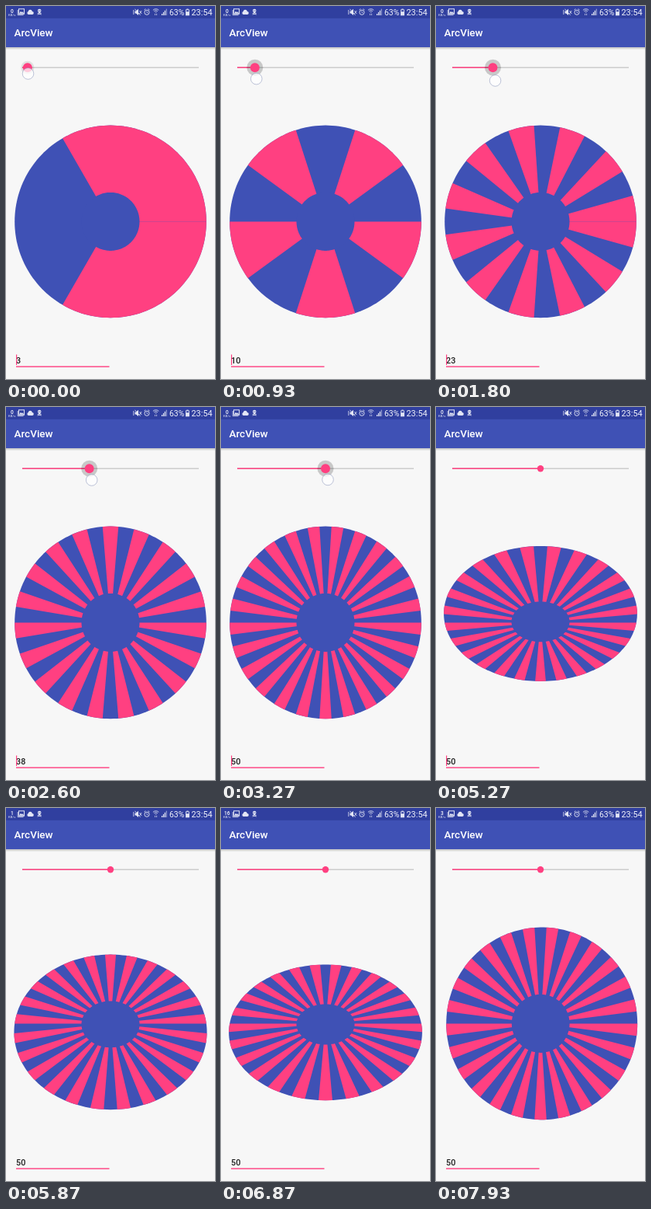
These frames come from a looping animation (270x480 px, 8 s). An HTML page with a canvas:

```html
<!DOCTYPE html>
<html lang="en">
<head>
<meta charset="utf-8">
<title>ArcView</title>
<style>
html, body { margin: 0; width: 100%; height: 100%; overflow: hidden; background: #f7f7f7; }
canvas { display: block; width: 100vw; height: 100vh; }
</style>
</head>
<body>
<canvas id="stage"></canvas>
<script>
const W = 270, H = 480, LOOP = 8000;
const PINK = '#ff4081', BLUE = '#3f51b5', DARK = '#303f9f', PAPER = '#f7f7f7';
const RAD = Math.PI / 180;
const WHEEL = { x: 135, y: 277.4, r: 123.8, hole: 37.5, camera: 680 };
const SPIN = 3000, SPIN_X = 4570, SPIN_Y = 7720;
const RELEASE = 3800;

const canvas = document.getElementById('stage');
const ctx = canvas.getContext('2d');

function resize() {
  const dpr = window.devicePixelRatio || 1;
  canvas.width = Math.round(innerWidth * dpr);
  canvas.height = Math.round(innerHeight * dpr);
}
addEventListener('resize', resize);
resize();

const clamp = v => Math.max(0, Math.min(1, v));
const easeInOut = v => (1 - Math.cos(Math.PI * clamp(v))) / 2;

// Piecewise linear value through [time, value] points
function track(points, t) {
  for (let i = 1; i < points.length; i++) {
    const [t0, v0] = points[i - 1], [t1, v1] = points[i];
    if (t < t1) return v0 + (v1 - v0) * clamp((t - t0) / (t1 - t0));
  }
  return points[points.length - 1][1];
}

const COUNT = [[0, 3], [900, 10.5], [1800, 23.2], [2600, 38.2], [3270, 50]];
const FINGER_DX = [[0, 0.7], [1800, 3.1], [3800, 3]];
const FINGER_Y = [[0, 87], [700, 93], [1800, 96], [2600, 94], [3800, 93]];

function text(str, x, y, size, color, weight = 400, align = 'left') {
  ctx.font = `${weight} ${size}px Roboto, sans-serif`;
  ctx.textAlign = align;
  ctx.fillStyle = color;
  ctx.fillText(str, x, y);
}

function disc(x, y, r, fill, stroke, width = 1) {
  ctx.beginPath();
  ctx.arc(x, y, r, 0, 2 * Math.PI);
  if (fill) { ctx.fillStyle = fill; ctx.fill(); }
  if (stroke) { ctx.strokeStyle = stroke; ctx.lineWidth = width; ctx.stroke(); }
}

function rect(x, y, w, h, color) {
  ctx.fillStyle = color;
  ctx.fillRect(x, y, w, h);
}

function line(points, color, width) {
  ctx.beginPath();
  points.forEach(([x, y]) => ctx.lineTo(x, y));
  ctx.strokeStyle = color;
  ctx.lineWidth = width;
  ctx.stroke();
}

function fillPath(points, color) {
  ctx.beginPath();
  points.forEach(([x, y]) => ctx.lineTo(x, y));
  ctx.closePath();
  ctx.fillStyle = color;
  ctx.fill();
}

function drawWheel(count, ax, ay) {
  const { x: cx, y: cy, camera } = WHEEL;
  const project = (r, deg) => {
    const x = r * Math.cos(deg * RAD), y = r * Math.sin(deg * RAD);
    const y2 = y * Math.cos(ax), z1 = y * Math.sin(ax);
    const x2 = x * Math.cos(ay) + z1 * Math.sin(ay);
    const z2 = z1 * Math.cos(ay) - x * Math.sin(ay);
    const k = camera / (camera - z2);
    return [cx + x2 * k, cy + y2 * k];
  };
  const arc = (r, from, to) => {
    const steps = Math.max(2, Math.ceil((to - from) / 2));
    return Array.from({ length: steps + 1 }, (_, i) => project(r, from + (to - from) * i / steps));
  };
  const sweep = 360 / count;
  fillPath(arc(WHEEL.r, 0, 360), BLUE);
  for (let i = 0; i < count; i += 2) {
    fillPath([[cx, cy], ...arc(WHEEL.r, i * sweep, (i + 1) * sweep)], PINK);
  }
  fillPath(arc(WHEEL.hole, 0, 360), BLUE);
}

function drawSlider(t, count) {
  const x = 21 + count * 2.28, y = 79.2;
  rect(21, y - 0.65, 228, 1.3, '#c6c6c6');
  rect(21, y - 0.75, x - 21, 1.5, PINK);
  if (t < RELEASE) {
    const grow = clamp(t / 150);
    disc(x, y, 8.5 + 2 * grow, `rgba(0,0,0,${0.09 + 0.1 * grow})`);
    disc(x, y, 6, PINK);
  } else {
    disc(x, y, 6 - 1.8 * clamp((t - RELEASE) / 70), PINK);
  }
}

function drawTouch(t, count) {
  if (t < RELEASE) {
    const x = 21 + count * 2.28 + track(FINGER_DX, t);
    disc(x, track(FINGER_Y, t), 7.3, 'rgba(255,255,255,.72)', 'rgba(135,145,185,.6)', 0.9);
  } else if (t >= 4530 && t < 4660) {
    disc(192.3, 316.8, 6.8, 'rgba(175,175,215,.5)', 'rgba(150,150,195,.65)', 0.9);
  }
}

function drawField(t, count) {
  text(String(count), 13, 459.6, 10.8, '#1e1e1e', 500);
  rect(13, 463.4, 120.5, 1.4, PINK);
  const cursorOn = t < 3270 || (t - 3270) % 1000 < 500;
  if (cursorOn) rect(13, 448.5, 1.2, 13.5, PINK);
}

function netSpeed(t) {
  if (t < 5500) return '0';
  if (t < 6500) return '1';
  return t < 7500 ? '16' : '3';
}

function drawStatusIcons() {
  const ink = '#e3e6f5';
  // picture
  ctx.strokeStyle = ink;
  ctx.lineWidth = 1;
  ctx.strokeRect(16.5, 3.8, 7, 6.4);
  line([[15.2, 5], [15.2, 11.6], [22.5, 11.6]], ink, 0.8);
  fillPath([[17, 9.8], [19, 6.8], [20.4, 8.3], [21.6, 7.2], [23.2, 9.8]], ink);
  // cloud
  disc(29.3, 9, 1.9, ink);
  disc(31.3, 7.2, 2.5, ink);
  disc(33.8, 8.9, 2, ink);
  rect(29.3, 8.5, 4.5, 2.4, ink);
  // small face
  disc(43.2, 6, 2.3, ink);
  rect(42, 7, 2.4, 2, ink);
  disc(42.3, 6.1, 0.6, DARK);
  disc(44.1, 6.1, 0.6, DARK);
  line([[40.6, 11], [45.8, 9.2]], ink, 0.8);
  line([[40.6, 9.2], [45.8, 11]], ink, 0.8);
  // muted speaker with vibration bar
  line([[164.8, 5], [164.8, 11]], ink, 0.8);
  fillPath([[166.5, 6.5], [168, 6.5], [171, 3.7], [171, 12], [168, 9.4], [166.5, 9.4]], ink);
  line([[166.5, 3.8], [173.5, 11.8]], ink, 0.9);
  line([[172.4, 6], [175.2, 10]], ink, 0.8);
  line([[175.2, 6], [172.4, 10]], ink, 0.8);
  // alarm
  disc(182, 8.2, 3.1, null, ink, 0.9);
  line([[182, 6.3], [182, 8.4], [183.4, 8.9]], ink, 0.7);
  line([[178.6, 5], [180.4, 3.7]], ink, 0.9);
  line([[183.6, 3.7], [185.4, 5]], ink, 0.9);
  // wireless
  for (const r of [1.2, 3.2, 5.2]) {
    ctx.beginPath();
    ctx.arc(193.6, 9, r, -135 * RAD, -45 * RAD);
    ctx.strokeStyle = ink;
    ctx.lineWidth = 0.9;
    ctx.stroke();
  }
  line([[192.6, 9.8], [192.6, 12]], ink, 0.7);
  line([[194.6, 9.8], [194.6, 12]], ink, 0.7);
  // signal bars
  for (let i = 0; i < 4; i++) {
    const h = 2 + i * 2.1;
    rect(201 + i * 1.9, 12 - h, 1.2, h, i < 3 ? ink : 'rgba(227,230,245,.6)');
  }
  // battery
  rect(233.4, 3.6, 2.2, 1.2, ink);
  ctx.strokeStyle = ink;
  ctx.lineWidth = 0.8;
  ctx.strokeRect(232.4, 4.9, 4.2, 7);
  rect(232.4, 7.2, 4.2, 4.7, ink);
}

function drawBars(t) {
  const shade = ctx.createLinearGradient(0, 53, 0, 56.5);
  shade.addColorStop(0, 'rgba(0,0,0,.22)');
  shade.addColorStop(1, 'rgba(0,0,0,0)');
  rect(0, 53, W, 3.5, shade);
  rect(0, 0, W, 53, BLUE);
  rect(0, 0, W, 15.8, DARK);
  text('ArcView', 10.5, 39, 13.5, '#fff', 500);
  text(netSpeed(t), 7.8, 8.6, 6.6, '#fff', 500, 'center');
  text('KB/s', 7.8, 13, 4.3, '#dfe3f5', 400, 'center');
  drawStatusIcons();
  text('63%', 211, 12, 10.4, '#f0f2fb');
  text('23:54', 239.5, 12, 10.9, '#f0f2fb');
}

function draw(t) {
  ctx.setTransform(canvas.width / W, 0, 0, canvas.height / H, 0, 0);
  rect(0, 0, W, H, PAPER);
  const count = Math.floor(track(COUNT, t));
  const turn = start => -360 * RAD * easeInOut((t - start) / SPIN);
  drawBars(t);
  drawSlider(t, count);
  drawWheel(count, turn(SPIN_X), turn(SPIN_Y));
  drawField(t, count);
  drawTouch(t, count);
}

function tick() {
  draw(performance.now() % LOOP);
  requestAnimationFrame(tick);
}
tick();
</script>
</body>
</html>
```
